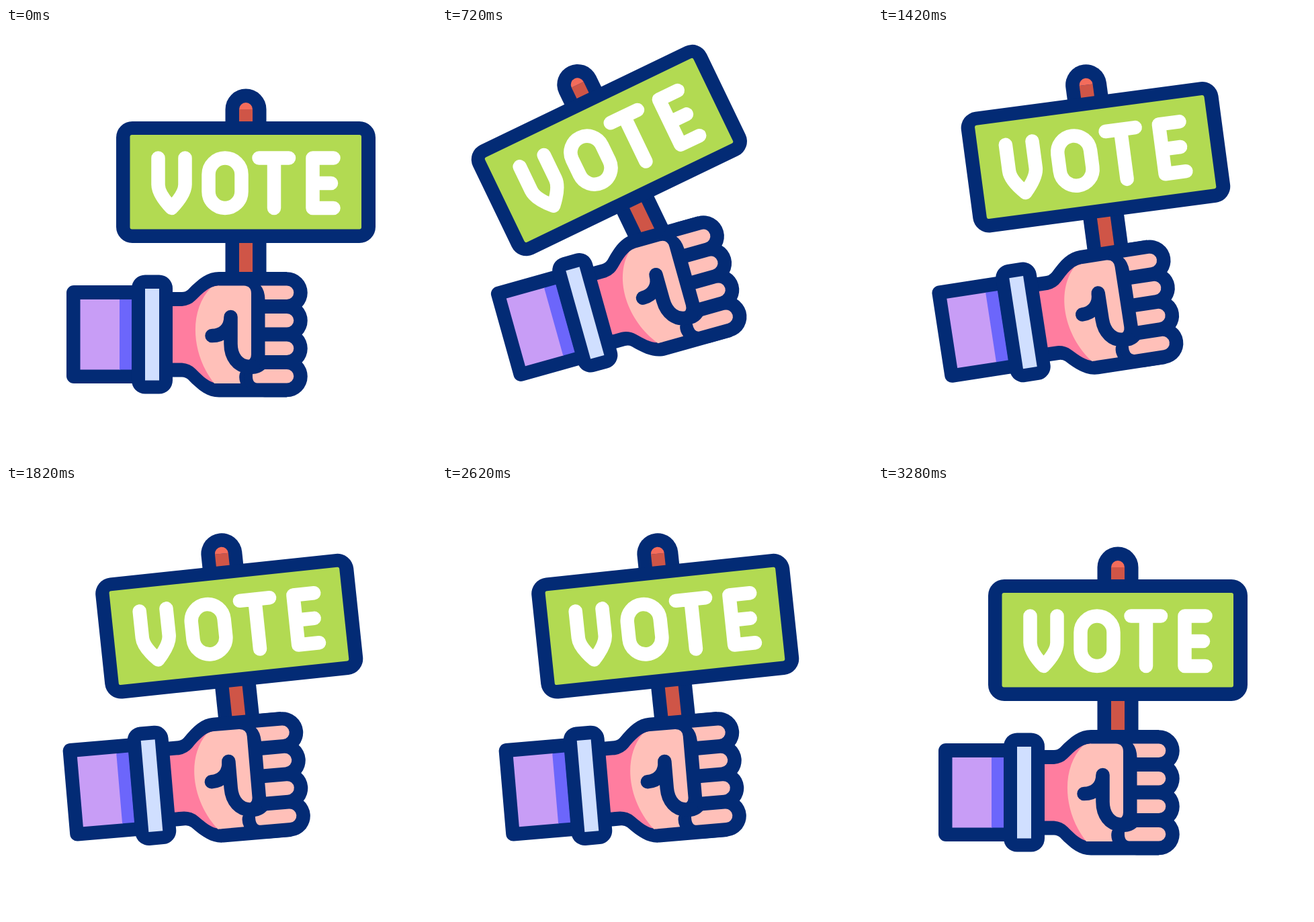
An HTML page for the animation above (3.4 s loop, 640x640 px).

```html
<!DOCTYPE html>
<html lang="en">
<head>
<meta charset="utf-8">
<title>Vote sign</title>
<style>
  html, body { margin: 0; height: 100%; overflow: hidden; background: #fff; }
  svg { display: block; width: 100vw; height: 100vh; }
  .navy { fill: #032b75; }
  .skin { fill: #ffc0b9; }
  .line { fill: none; stroke: #032b75; stroke-width: 20.5; stroke-linecap: round; stroke-linejoin: round; }
  .letters { stroke: #fff; }
  .knuckles { stroke-width: 61.5; }
</style>
</head>
<body>
<svg viewBox="0 0 640 640">
  <g id="arm">
    <g id="sign">
      <path class="navy" d="M326.5 456V121a30.500 30.500 0 0 1 61 0V456z"/>
      <path fill="#cf5547" d="M347 121H367V456H347z"/>
      <path fill="#f46c5b" d="M347 121a10 10 0 0 1 20 0z"/>
      <rect class="navy" x="164" y="139" width="386" height="181" rx="24"/>
      <rect fill="#b2da52" x="184.5" y="159" width="344.5" height="140.5" rx="3"/>
      <g class="line letters">
        <path d="M226.500 193.500V233q0 14 20 35q20-21 20-35V193.500"/>
        <rect x="301.5" y="193.5" width="49" height="74.5" rx="24.5"/>
        <path d="M376.500 193.500H421M399 193.500V268"/>
        <path d="M487.500 193.500H456.500V268H487.500M456.500 231H484"/>
      </g>
    </g>

    <!-- sleeve -->
    <rect class="navy" x="90" y="383" width="120" height="146" rx="11"/>
    <path fill="#c89df6" d="M110.500 404H170V508.500H110.500z"/>
    <path fill="#6c66fb" d="M169 404H187.500V508.500H169z"/>

    <!-- fist -->
    <path class="navy" d="M240 393H262Q267 393 271 389.500C287 373 300 363 317 363H418V549.500H317C300 549.500 287 539.500 271 523Q267 519.500 262 519.500H240z"/>
    <path class="line knuckles" d="M385 394H418M385 435.500H418M385 477H418M385 518.500H418"/>
    <path fill="#ff7d9f" d="M240 414H262Q274 413 282 405C293 394 303 384 317 383.500V529C303 529 293 518.500 282 507.500Q274 499.500 262 498.500H240z"/>
    <path class="skin" d="M305 386.500Q311 383.500 317 383.500H354Q365 384 365 395V486Q365 494 357 496L348 514Q346 521 349 529H310C275 485 272 420 305 386.500z"/>
    <path class="line" d="M306.500 458C322 458 334.500 448 334.500 430V470C334.500 489 345 504 362 504H368"/>
    <path class="skin" d="M379 383.500H418a10.300 10.300 0 0 1 0 20.600H385.500Q385 390 379 383.500z"/>
    <path class="skin" id="finger" d="M385.500 425H418a10.300 10.300 0 0 1 0 20.600H385.500z"/>
    <use href="#finger" y="41.5"/>
    <path class="skin" d="M385 508H418a10.300 10.300 0 0 1 0 20.600H374Q366 528 367 515Q377 515 385 508z"/>

    <!-- cuff -->
    <rect class="navy" x="187" y="367.5" width="61" height="177" rx="20"/>
    <path fill="#d0dfff" d="M207 388H228V524.500H207z"/>
  </g>
</svg>
<script>
  const LOOP = 3400, SWING = 400, SWINGS = 8, LAG = 45;
  const arm = document.getElementById('arm');
  const sign = document.getElementById('sign');

  // Ease between turning points: rest, two opening peaks, high and low in turn, rest
  function swing(t, opening, high, low) {
    const peak = i => i <= 0 || i >= SWINGS ? 0 : opening[i - 1] ?? (i % 2 ? high : low);
    const i = Math.floor(t / SWING);
    const x = t / SWING - i;
    return peak(i) + (peak(i + 1) - peak(i)) * x * x * (3 - 2 * x);
  }

  function draw() {
    const t = performance.now() % LOOP;
    // From the third peak on, the sign trails the arm
    const third = 3 * SWING;
    const signTime = Math.min(t, third) + Math.max(0, t - third - LAG);
    arm.setAttribute('transform', `rotate(${swing(t, [14, -19], 5.4, -19)} 98 457)`);
    sign.setAttribute('transform', `rotate(${swing(signTime, [7, -12], 6.3, -6.3)} 357 456)`);
    requestAnimationFrame(draw);
  }
  draw();
</script>
</body>
</html>
```
